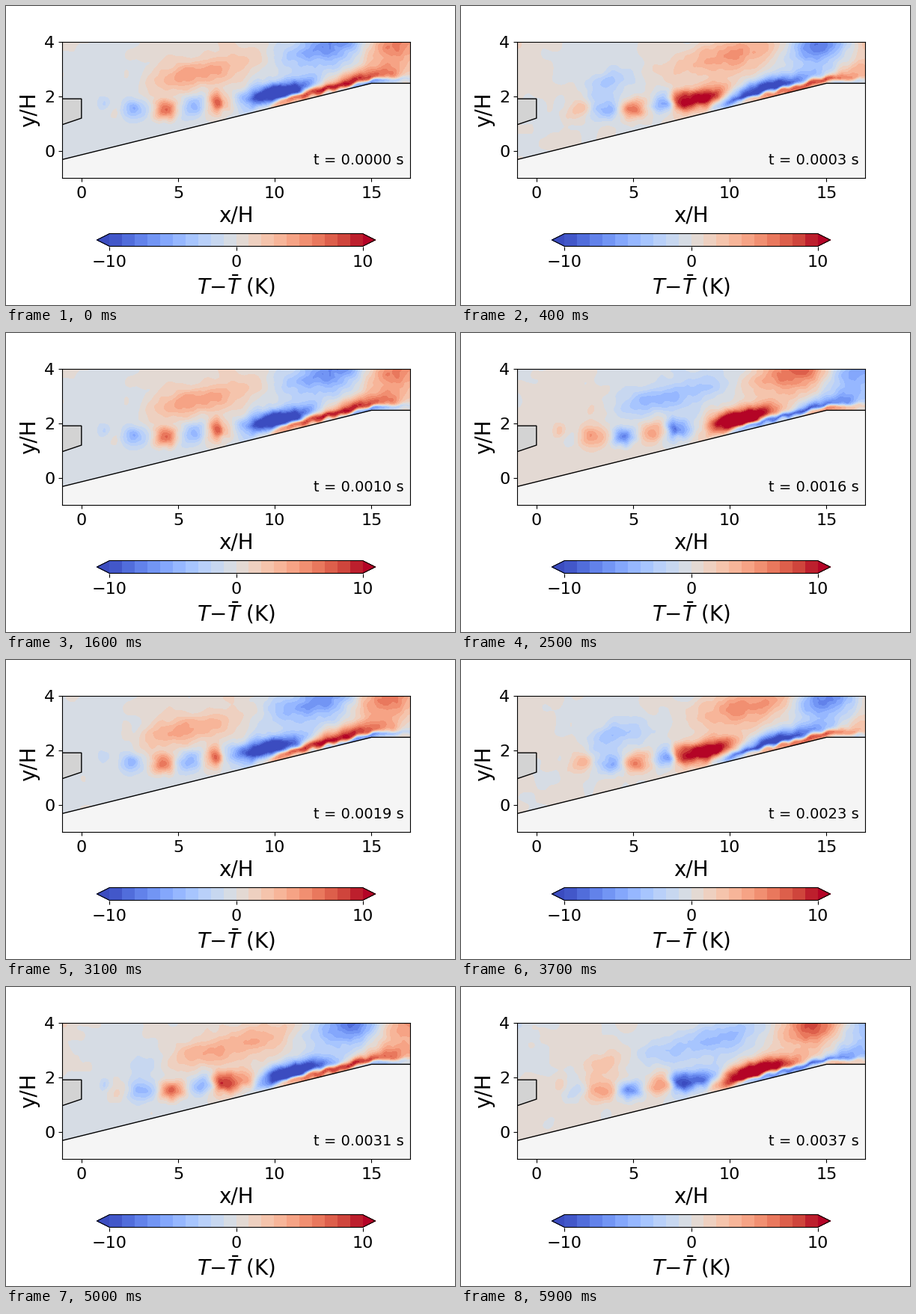
Animation of 600 by 400 pixels, one loop 6000 ms. Source, as a matplotlib script:

```python
import matplotlib.pyplot as plt
import numpy as np
from matplotlib.animation import FuncAnimation

W, H, DPI = 600, 400, 100
FRAMES, INTERVAL = 60, 100
PERIOD = 16               # frames per oscillation
DT = 6.25e-5              # seconds per frame
LEFT, RIGHT, TOP, BOTTOM = 75, 540, 48, 230.2

RAMP_X, RAMP_Y = [-1, 15, 17], [-0.32, 2.48, 2.48]
X, Y = np.meshgrid(np.linspace(-1, 17, 234), np.linspace(4, -0.4, 81))

rng = np.random.default_rng(4)


def noise(size):
    """Unit-variance random field smoothed over `size` grid cells."""
    fy = np.fft.fftfreq(X.shape[0])[:, None]
    fx = np.fft.fftfreq(X.shape[1])[None, :]
    low_pass = np.exp(-2 * (np.pi * size) ** 2 * (fx**2 + fy**2))
    field = np.fft.ifft2(np.fft.fft2(rng.standard_normal(X.shape)) * low_pass).real
    return field / field.std()


def bell(v, center, width):
    return np.exp(-0.5 * ((v - center) / width) ** 2)


def step(v, center, width):
    return 0.5 + 0.5 * np.tanh((v - center) / width)


def phasor(crest):
    """Oscillation that peaks at frame `crest`."""
    return np.exp(2j * np.pi * crest / PERIOD)


def upper_crest(x):
    return np.interp(x, [-1, 2, 5, 8, 13, 17], [-12.5, -6, -0.5, 2, 8.3, 17])


def lower_crest(x):
    return np.interp(x, [1.8, 6, 7.3, 10, 17], [3, 24.5, 35, 40, 51.5])


def upper_layer(x, y):
    """Broad band that rises above the ramp."""
    mid = np.minimum(2.3 + 0.155 * (x - 2.5), 3.95)
    amp = 3.8 * step(x, 3, 0.7) + 3.5 * bell(x, 13.8, 2)
    width = 0.32 + 0.25 * step(x, 10, 3)
    lean = 0.6 * step(x, 10, 2) * np.clip(mid - y, -0.5, 1)
    return amp * bell(y, mid, width) * phasor(upper_crest(x + lean))


def lower_layer(x, y):
    """Vortex train that grows along the ramp, with a thin sheared layer at the wall."""
    mid = 1.5 + 0.115 * np.maximum(x - 5, 0)
    amp = (4 * bell(x, 2.5, 0.6) + 7.5 * bell(x, 4.5, 0.75) + 3 * bell(x, 7.2, 0.6)
           + 16 * bell(x, 9.9, 2) + 8 * bell(x, 14.5, 2))
    width = np.where(y > mid, 0.28, 0.24)
    downstream = step(x, 9.5, 1)
    lean = downstream * np.clip(mid - y, -0.7, 0.4)
    height = np.maximum(y - np.interp(x, RAMP_X, RAMP_Y), 0)
    shear = 7 * downstream * np.exp(-(height / 0.2) ** 2)
    return amp * bell(y, mid, width) * phasor(lower_crest(x + lean) + shear)


def background(x, y):
    above = step(y, 2.05, 0.3)
    near = 1 - step(x, 8, 1.5)
    return 0.55 * above * phasor(upper_crest(x)) + 0.6 * (1 - above) * near * phasor(8.5)


def build_mode():
    x = X + 0.06 * noise(2.5)
    y = Y + 0.03 * noise(2)
    spot = 2.3 * bell(x, 1.2, 0.22) * bell(y, 1.7, 0.16) * phasor(9.5)
    waves = (upper_layer(x, y) + lower_layer(x, y)) * (1 + 0.04 * noise(1.3))
    return waves + spot + background(x, y) + 0.25 * (noise(3.5) + 1j * noise(3.5))


MODE = build_mode()


def stage_axes(left, top, right, bottom):
    return fig.add_axes([left / W, 1 - bottom / H, (right - left) / W, (bottom - top) / H])


def draw_field(n):
    field = (MODE * phasor(-n)).real
    return ax.contourf(X, Y, field, levels=np.linspace(-10, 10, 21),
                       cmap="coolwarm", extend="both", zorder=0)


fig = plt.figure(figsize=(W / DPI, H / DPI), dpi=DPI, facecolor="white")
ax = stage_axes(LEFT, TOP, RIGHT, BOTTOM)
contours = draw_field(0)

# Ramp and nozzle
ax.fill_between(RAMP_X, RAMP_Y, -1, color="whitesmoke", lw=0, zorder=1)
ax.plot(RAMP_X, RAMP_Y, color="black", lw=1, zorder=2)
ax.fill([-1, 0, 0, -1], [1.91, 1.91, 1.2, 0.96], fc="lightgray", ec="black", lw=1, zorder=2)

ax.set(xlim=(-1, 17), ylim=(-1, 4), xticks=[0, 5, 10, 15], yticks=[0, 2, 4])
ax.tick_params(labelsize=16)
ax.tick_params(axis="x", pad=4.5)
ax.set_xlabel("x/H", fontsize=20)
ax.set_ylabel("y/H", fontsize=20)
clock = ax.text(12, -0.5, "", fontsize=14)

cbar = fig.colorbar(contours, cax=stage_axes(121.5, 304.5, 493.5, 321.5),
                    orientation="horizontal", ticks=[-10, 0, 10])
cbar.minorticks_off()
cbar.ax.tick_params(labelsize=16, pad=4.5)
cbar.set_label(r"$T{-}\bar{T}$ (K)", fontsize=20)


def update(n):
    global contours
    contours.remove()
    contours = draw_field(n)
    clock.set_text(f"t = {n * DT:.4f} s")
    return contours, clock


anim = FuncAnimation(fig, update, frames=FRAMES, interval=INTERVAL,
                     init_func=lambda: update(0), repeat=True, repeat_delay=0)
plt.show()
```
